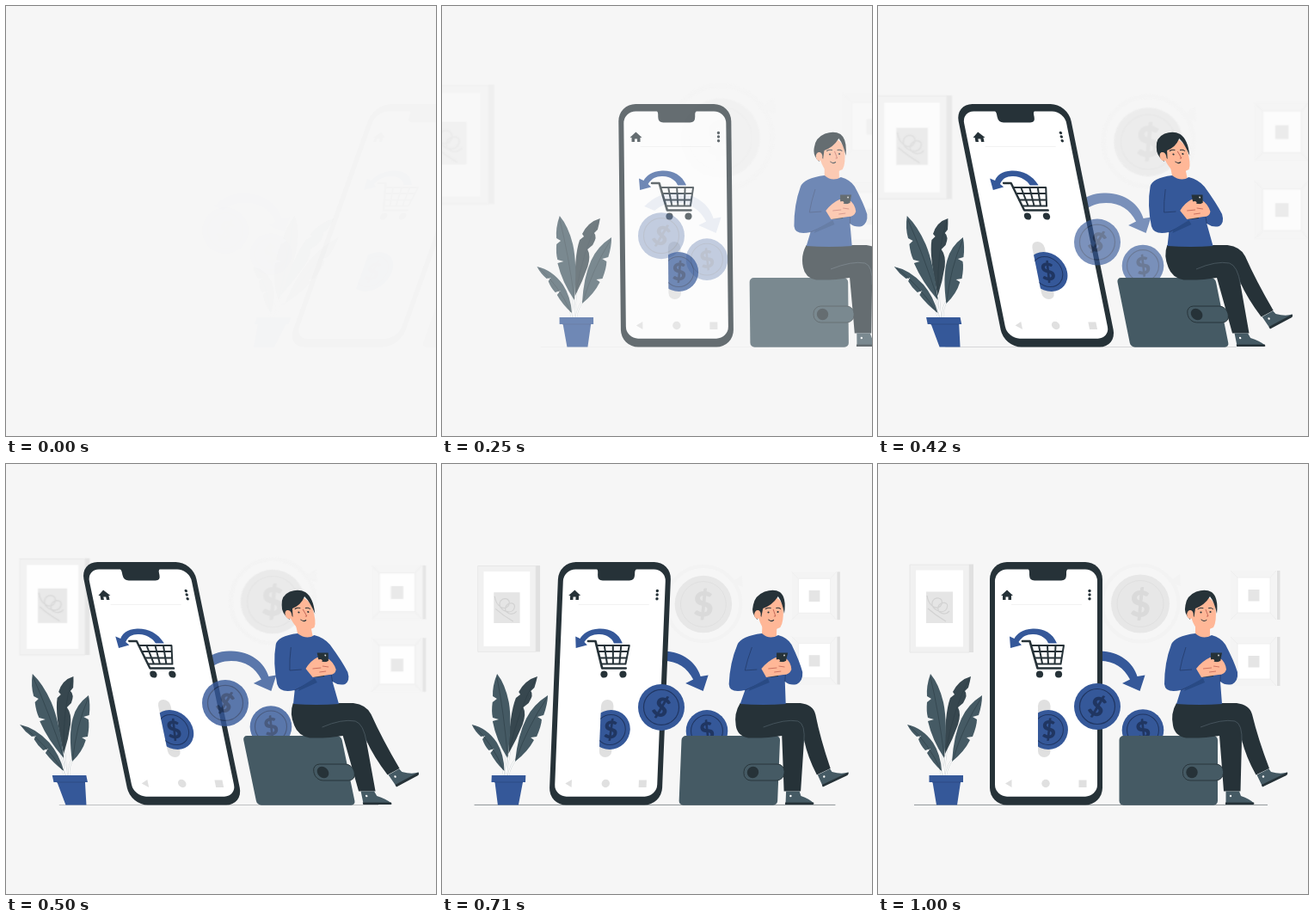
An HTML page for the animation above (1.04 s loop, 500 px wide and 500 px high).

```html
<!DOCTYPE html>
<html lang="en">
<head>
<meta charset="utf-8">
<title>Mobile cashback</title>
<style>
  html, body { margin: 0; width: 100%; height: 100%; overflow: hidden; background: #f6f6f6; }
  svg { display: block; width: 100vw; height: 100vh; }
  text { font-family: Lato, "Open Sans", sans-serif; font-weight: 900; text-anchor: middle; }
  .blue { fill: #355899; }
  .navy { fill: #203662; }
  .dark { fill: #263238; }
  .slate { fill: #455a64; }
  .skin { fill: #ffb797; }
  .grey { fill: #e0e0e0; }
  .pale { fill: #e5e5e5; }
  .white { fill: #fff; }
  .line { fill: none; stroke: #263238; stroke-linecap: round; stroke-linejoin: round; }
  .vein { fill: none; stroke: #2c3d45; stroke-width: .6; }
</style>
</head>
<body>
<svg viewBox="0 0 500 500">
  <defs>
    <clipPath id="slotCut"><path d="M186 280h45v60h-45z"/></clipPath>
    <g id="coin">
      <circle class="blue" r="27"/>
      <circle r="20.5" fill="none" stroke="#203662" stroke-width="1.2"/>
    </g>
    <g id="frame">
      <path fill="#f4f4f4" d="M410 124h53v57h-53z"/>
      <path fill="none" stroke="#ededed" stroke-width=".8" d="M410 124l8 8M463 124l-7 8M410 181l8-8M463 181l-7-8"/>
      <path class="grey" d="M464 124h3.500v57H464z"/>
      <path class="white" stroke="#ededed" stroke-width=".8" d="M418 132h38v41h-38z"/>
      <path class="pale" d="M430.500 146h13v13.500h-13z"/>
    </g>
  </defs>

  <path id="floor" d="M42 396.400H453" stroke="#263238" stroke-width=".5"/>

  <g id="wall">
    <path fill="#f1f1f1" stroke="#e8e8e8" d="M37 117h69v102H37z"/>
    <path class="grey" d="M106 116.500h5v102.500h-5z"/>
    <path class="white" d="M44 123.500h55v89H44z"/>
    <path class="pale" d="M56 148.500h31v36.500H56z"/>
    <path fill="none" stroke="#d2d2d2" stroke-width="1.2" d="M57 153c2 14 14 18 17 10s-9-10-11-2 13 15 17 7-8-9-10-2 8 11 13 5M58 168q9 8 21 15"/>
    <circle cx="305" cy="162" r="44.500" fill="none" stroke="#f3f3f3" stroke-width="4"/>
    <path fill="#f3f3f3" d="M338 137l13-9 1 14z"/>
    <circle cx="305" cy="162.500" r="34" fill="#e7e7e7"/>
    <circle cx="305" cy="162.500" r="27" fill="none" stroke="#e0e0e0"/>
    <text x="305" y="177" font-size="41" fill="#dadada">$</text>
    <use href="#frame"/>
    <use href="#frame" y="77"/>
  </g>

  <path id="arrow" class="blue" d="M221 233C234 220 246 217 258 217.500C281 218 297 231 301.500 247L310.500 245.500L304.500 264L284 255L293 250.500C286 237 275 229 258 229C248 229 240 232 233 238Z"/>

  <g id="plant">
    <path fill="none" stroke="#c8cfd1" stroke-width="2" d="M75 335l1 28M80 330l-4 33M88 342q-8 9-9 21M72 354l2 9"/>
    <path fill="none" stroke="#fff" stroke-width="1.200" d="M75 335l1 28M80 330l-4 33M88 342q-8 9-9 21M72 354l2 9"/>
    <path fill="#37474f" d="M108 247Q94 251 87 265L89 268L84 272Q77 291 78 337Q87 320 93 303Q97 290 93 283L99 278Q105 268 101 264L105 260Q107 253 108 247Z"/>
    <path class="slate" d="M61 244Q56 258 57 270L62 273L57 277Q56 288 58 295L65 297L58 299Q63 321 77 342Q81 300 76 277Q71 256 61 244Z"/>
    <path class="slate" d="M121 269Q104 280 97 296Q88 315 86 346Q100 335 107 321L103 318L110 317Q115 304 115 297L110 294L117 292Q121 280 121 269Z"/>
    <path class="slate" d="M34 303Q38 311 45 317L50 316L47 320Q50 328 55 333L61 331L57 336Q63 347 74 357Q73 338 64 324Q52 307 34 303Z"/>
    <path class="vein" d="M61 248Q71 290 77 340M106 250Q88 283 79 333M120 272Q99 305 87 344M37 305Q59 325 73 356"/>
    <path class="blue" d="M59.500 362h39.500v8h-3l-4 26.500H68l-4.500-26.500h-4z"/>
    <path stroke="#2a477d" stroke-width=".7" d="M63 370h33"/>
  </g>

  <g id="phone">
    <rect class="dark" x="130" y="114" width="131" height="282.500" rx="20"/>
    <rect class="white" x="136" y="122.500" width="119" height="264.200" rx="14"/>
    <path class="dark" d="M173 121h50q-4 1-4 5v3q0 6.500-6 6.500h-31q-6 0-6-6.500v-3q0-4-3-5z"/>
    <path class="dark" d="M143 153l7-6.500 7 6.500h-2v5h-3.500v-3.500h-3v3.500H145v-5z"/>
    <g class="dark"><circle cx="246" cy="147.500" r="1.700"/><circle cx="246" cy="152" r="1.700"/><circle cx="246" cy="156.700" r="1.700"/></g>
    <path stroke="#f2f2f2" d="M155 163.500h82"/>
    <path class="blue" d="M208 208.500C203 196 192 191 180 191.500C168 192 161 198 158.500 203L153 200.500L154 214L167 210.500L163.500 207C168 200 174 197.500 181 198C190 198.500 196 203 198 208.500Z"/>
    <path class="line" stroke-width="2.700" d="M168 206h8.500L185.500 237.500H213"/>
    <path class="line" stroke-width="2" d="M178 211h38l-3.500 21.500H184M180 218h34M182 225.500h31.500M187 211l4 21M197 211l1 21M206.500 211l-1 21"/>
    <circle class="dark" cx="188" cy="244.500" r="4.100"/>
    <circle class="dark" cx="210" cy="244.500" r="4.100"/>
    <rect class="grey" x="186" y="274" width="14.500" height="67" rx="7.250"/>
    <g clip-path="url(#slotCut)">
      <use href="#coin" transform="translate(198 309) scale(.85)"/>
      <text class="navy" x="198.500" y="319" font-size="28">$</text>
    </g>
    <path class="grey" d="M148 371.500l7.500-4.500v9zM233.500 367.500h9v8.500h-9z"/>
    <circle class="grey" cx="195" cy="371.500" r="4.700"/>
  </g>

  <g id="coins">
    <g transform="translate(255 282)">
      <use href="#coin"/>
      <text class="navy" y="11" font-size="31" transform="rotate(25)">$</text>
    </g>
    <g transform="translate(308 309.500)">
      <use href="#coin" transform="scale(.9)"/>
      <text class="navy" y="10" font-size="28" transform="rotate(-12)">$</text>
    </g>
  </g>

  <g id="person">
    <rect class="slate" x="280.500" y="316" width="114.500" height="80.700" rx="5"/>
    <path class="dark" d="M347 278Q340 290 343 304Q345 316 358 318.500Q380 319 397 316Q399 340 402 380.500H421.500L423 321Q428 341 439.500 361.500L455 354Q442 320 435 291Q432 280 417 278Z"/>
    <path fill="none" stroke="#52616a" stroke-width=".7" d="M375 306Q400 296 415 299Q424 302 423 324"/>
    <path class="slate" d="M440.500 361.500L454.500 354.500L457 358Q468 361 476 358.500L475 361L447 375Z"/>
    <path class="dark" d="M446 373L476 358.500Q477 361 474 362.500L447 375.500Z"/>
    <path class="slate" d="M404.500 380.500H420L422 386Q432 389 437 394.500H404.500Z"/>
    <path class="dark" d="M404 393.500H437Q438 396 436 396H404Z"/>
    <circle class="white" cx="448" cy="363.500" r="1.200"/>
    <circle class="white" cx="410" cy="386" r="1.200"/>
    <rect class="slate" x="354.500" y="349" width="47" height="19" rx="8.500" stroke="#263238" stroke-width=".9"/>
    <circle class="dark" cx="365" cy="358.500" r="6.700"/>

    <path class="skin" d="M369 184h17v16q-8 6-17 0z"/>
    <path class="blue" d="M369 197Q378 205 388 199Q399 202 404 210Q414 229 418 242Q419 252 412 256Q404 258 398 253L400 279Q374 281 347 279L352 263Q334 267 333 256Q333 231 341 210Q345 200 369 197Z"/>
    <path fill="none" stroke="#263f70" stroke-width=".9" d="M358 213Q353 228 351 240L365 239M352 263L374 253M396 225Q399 236 398 253"/>
    <path fill="#294a84" d="M358 260L378 249L380 254L356 264Z"/>
    <path class="dark" d="M377 246l12-3 1 4-12 1z"/>
    <path class="skin" d="M370 238Q377 229 386 225L398 226Q404 230 405 239Q403 245 396 245L376 248Z"/>
    <path class="dark" d="M387 219.500h13l-2 11-11-1z"/>
    <path class="skin" d="M381 228l9-1q3 2-1 3.500l-8 2zM391 232l7-3q5 1 3 7l-6 1z"/>
    <path fill="none" stroke="#b8594d" stroke-width=".7" d="M378 238l10-1M390 235l7 1M385 242l8-1"/>
    <circle class="grey" cx="396" cy="222.500" r=".9"/>

    <path class="skin" d="M364 166Q366 154 380 154Q390 156 392.500 167Q394 184 390 190Q382 195 370 191Q365 183 364 177Z"/>
    <path class="dark" d="M363 181Q355 174 357.500 164Q359 153 370 148.500Q381 145 388 149Q396 155 394 174Q391 160 386 154Q380 164 369 168L367.500 178L364 173Z"/>
    <ellipse class="skin" cx="363" cy="175" rx="3.800" ry="5"/>
    <g class="dark"><circle cx="375.500" cy="172.500" r="1.100"/><circle cx="386.500" cy="172" r="1.100"/></g>
    <path class="line" stroke-width="1" d="M372 168.500q3-2 6-1M384.500 167.500q3-1 5 1M376 181q3 3 6 .5"/>
    <path fill="none" stroke="#b8594d" stroke-width=".8" d="M381 169l3 8h-2"/>
  </g>
</svg>
<script>
  const LOOP = 1040, FPS = 24, LEAD = 34.5;
  const part = id => document.getElementById(id);
  const mix = (a, b, p) => a + (b - a) * p;
  const slope = deg => Math.tan(deg * Math.PI / 180);

  const curve = (s, a, b) => 3 * (1 - s) ** 2 * s * a + 3 * (1 - s) * s * s * b + s ** 3;

  // cubic-bezier(.36, -.01, .5, 1.38)
  function ease(x) {
    if (x <= 0) return 0;
    if (x >= 1) return 1;
    let low = 0, high = 1;
    for (let i = 0; i < 24; i++) {
      const mid = (low + high) / 2;
      if (curve(mid, .36, .5) < x) low = mid; else high = mid;
    }
    return curve(low, -.01, 1.38);
  }

  function pose(id, transform, opacity) {
    const el = part(id);
    el.setAttribute("transform", transform);
    el.setAttribute("opacity", Math.max(0, Math.min(1, opacity)));
  }

  const zoom = (x, y, k) => `translate(${x} ${y}) scale(${k}) translate(${-x} ${-y})`;

  // Rush in from the right, lean forward, settle back
  function rush(t) {
    if (t < 600) {
      const p = ease(t / 600);
      return { dx: 250 * (1 - p), lean: mix(slope(-20), slope(10), p), alpha: p };
    }
    const lean = t < 800
      ? mix(slope(10), slope(-2), ease((t - 600) / 200))
      : mix(slope(-2), 0, ease((t - 800) / 200));
    return { dx: 0, lean, alpha: 1 };
  }

  const leaning = [["plant", 320], ["phone", 255], ["person", 272]];

  function draw(now) {
    const frame = Math.floor((now % LOOP + 4) * FPS / 1000);
    const t = frame * 1000 / FPS + LEAD;
    const p = ease(t / 1000);
    const { dx, lean, alpha } = rush(t);

    for (const [id, cy] of leaning)
      pose(id, `matrix(1 0 ${lean} 1 ${dx - lean * cy} 0)`, alpha);
    pose("wall", zoom(252.5, 187.5, 1.5 - p / 2), p);
    pose("floor", zoom(247.5, 396.4, .5 + p / 2), p * p);
    pose("arrow", `translate(${20 * (1 - p)} 0)`, p);
    pose("coins", `translate(0 ${-21 * (1 - p)})`, p);
  }

  const start = performance.now();
  function tick() {
    draw(performance.now() - start);
    requestAnimationFrame(tick);
  }
  tick();
</script>
</body>
</html>
```
